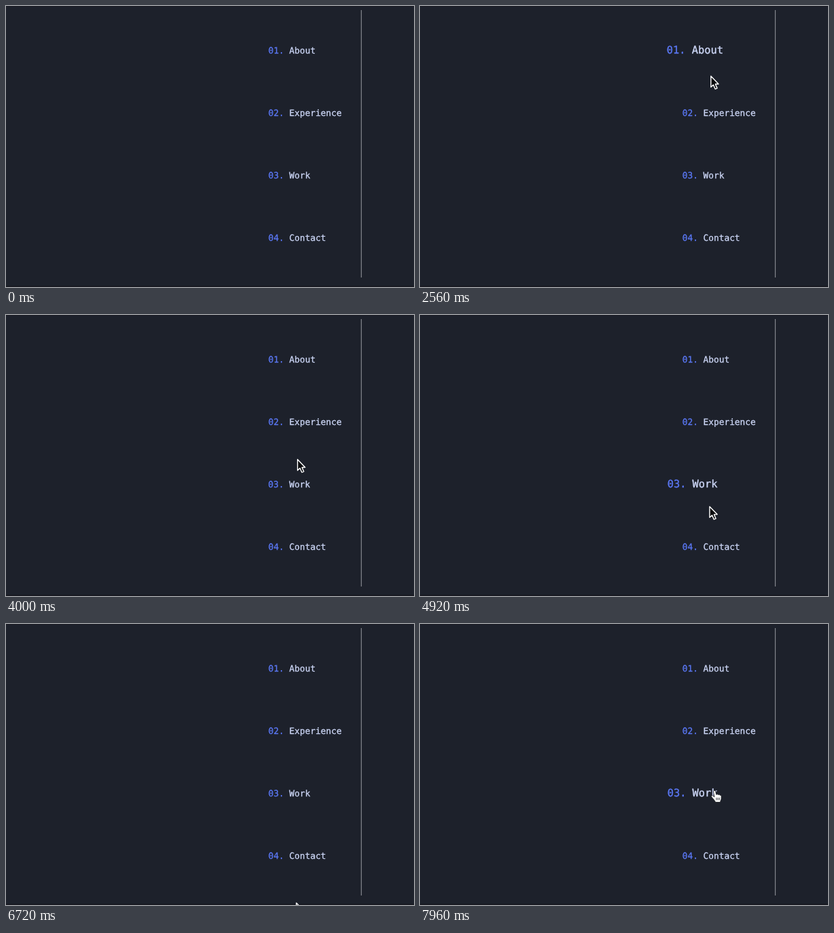
Animation of 600x414 px, one loop 8 s. Source, as an HTML page with a canvas:

```html
<!DOCTYPE html>
<html lang="en">
<head>
<meta charset="utf-8">
<title>Menu hover</title>
<style>
  html, body { margin: 0; width: 100%; height: 100%; overflow: hidden; background: #1d212b; }
  canvas { display: block; }
</style>
</head>
<body>
<canvas id="stage" width="600" height="414"></canvas>
<script>
const ctx = document.getElementById('stage').getContext('2d');
const LOOP = 8000;
const FADE = 500;
const CHAR = 7.706;
const REACH = 38;

// pointer key points: time, x, y
const path = [
  [1800, 426, -16], [1970, 426, 27], [2080, 426, 31], [2560, 427, 103],
  [3045, 428, 119], [3440, 428, 195], [3988, 428, 211], [4320, 426, 250],
  [4680, 426, 250], [4960, 425, 287], [5480, 426, 350], [5640, 426, 420],
  [6680, 426, 420], [7260, 429, 287], [7500, 433.5, 246]
];

const rows = ['About', 'Experience', 'Work', 'Contact'].map((label, i) => {
  const y = 65 + 92 * i;
  return { num: `0${i + 1}.`, label, y, hovers: findHovers(y) };
});

function pointerAt(t) {
  if (t < path[0][0]) return null;
  const i = path.findIndex(p => p[0] >= t);
  const b = path[i < 0 ? path.length - 1 : i];
  const a = i > 0 ? path[i - 1] : b;
  const k = a === b ? 0 : (t - a[0]) / (b[0] - a[0]);
  return { x: a[1] + (b[1] - a[1]) * k, y: a[2] + (b[2] - a[2]) * k };
}

// spans of time in which the pointer is near a row
function findHovers(y) {
  const spans = [];
  let inside = false;
  for (let t = 0; t <= LOOP; t += 4) {
    const p = pointerAt(t);
    const now = !!p && Math.abs(p.y - y) <= REACH;
    if (now && !inside) spans.push([t, LOOP]);
    if (!now && inside) spans[spans.length - 1][1] = t;
    inside = now;
  }
  return spans;
}

// cubic-bezier(.25, .1, .25, 1)
function ease(p) {
  if (p <= 0) return 0;
  if (p >= 1) return 1;
  let lo = 0, hi = 1;
  for (let i = 0; i < 24; i++) {
    const s = (lo + hi) / 2;
    if (0.75 * s * (1 - s) + s ** 3 < p) lo = s; else hi = s;
  }
  const r = 1 - lo;
  return 0.3 * r * r * lo + 3 * r * lo * lo + lo ** 3;
}

function growth(row, t) {
  let g = 0;
  for (const [enter, leave] of row.hovers) {
    if (t < enter) continue;
    g = ease((Math.min(t, leave) - enter) / FADE);
    if (t > leave) g *= 1 - ease((t - leave) / (FADE * g));
  }
  return g;
}

function write(text, x, color) {
  ctx.fillStyle = ctx.strokeStyle = color;
  ctx.fillText(text, x, 4.5);
  ctx.strokeText(text, x, 4.5);
}

function drawRow(row, t) {
  const g = growth(row, t);
  const half = (4 + row.label.length) * CHAR / 2;
  const scale = 1 + 0.2 * g;
  ctx.save();
  ctx.translate(385.8 + half - 16 * g, row.y);
  ctx.scale(scale, scale);
  ctx.font = '12.8px "DejaVu Sans Mono", monospace';
  ctx.textRendering = 'geometricPrecision';
  ctx.lineWidth = 0.3;
  write(row.num, -half, '#5b78f5');
  write(row.label, -half + 4 * CHAR, '#ccd6f6');
  ctx.restore();
}

function shape(d, fill, stroke, width) {
  const p = new Path2D(d);
  ctx.lineJoin = 'round';
  ctx.lineWidth = width;
  ctx.strokeStyle = stroke;
  ctx.fillStyle = fill;
  ctx.fill(p);
  ctx.stroke(p);
}

function drawArrow() {
  shape('M.8 .3V16.5L4.4 13.1L7.1 19.3L10 18.1L7.3 12H12Z', '#08090c', '#fff', 1.4);
}

function drawHand() {
  shape('M-2 1C-2-1 1-1 1.3 1L2.2 5.5C3 4.3 4.8 4.5 5 5.8C6 4.7 7.5 5.2 7.6 6.4' +
    'C8.6 5.8 9.8 6.4 9.6 8V11C9.6 13 8.3 14 8.1 16.6H1C.6 14-3.2 11-5 8.4' +
    'C-5.4 6.8-3.4 6.2-2.2 7.6L-.6 9Z', '#fff', '#111318', 0.8);
  ctx.beginPath();
  for (let x = 2.4; x < 8; x += 2.2) {
    ctx.moveTo(x, 9.8);
    ctx.lineTo(x, 13.6);
  }
  ctx.stroke();
}

function drawPointer(p) {
  const overText = rows.some(r => Math.abs(p.y - r.y) < 9);
  ctx.save();
  ctx.translate(p.x, p.y);
  if (overText) drawHand(); else drawArrow();
  ctx.restore();
}

function draw(t) {
  ctx.fillStyle = '#1d212b';
  ctx.fillRect(0, 0, 600, 414);
  ctx.fillStyle = '#181a22';
  ctx.fillRect(0, 0, 600, 1);
  ctx.fillRect(0, 412, 600, 2);
  ctx.fillStyle = '#83868d';
  ctx.fillRect(521.9, 6, 1.2, 394);
  rows.forEach(r => drawRow(r, t));
  const p = pointerAt(t);
  if (p) drawPointer(p);
}

const start = performance.now();
function frame() {
  draw((performance.now() - start) % LOOP);
  requestAnimationFrame(frame);
}
frame();
</script>
</body>
</html>
```
